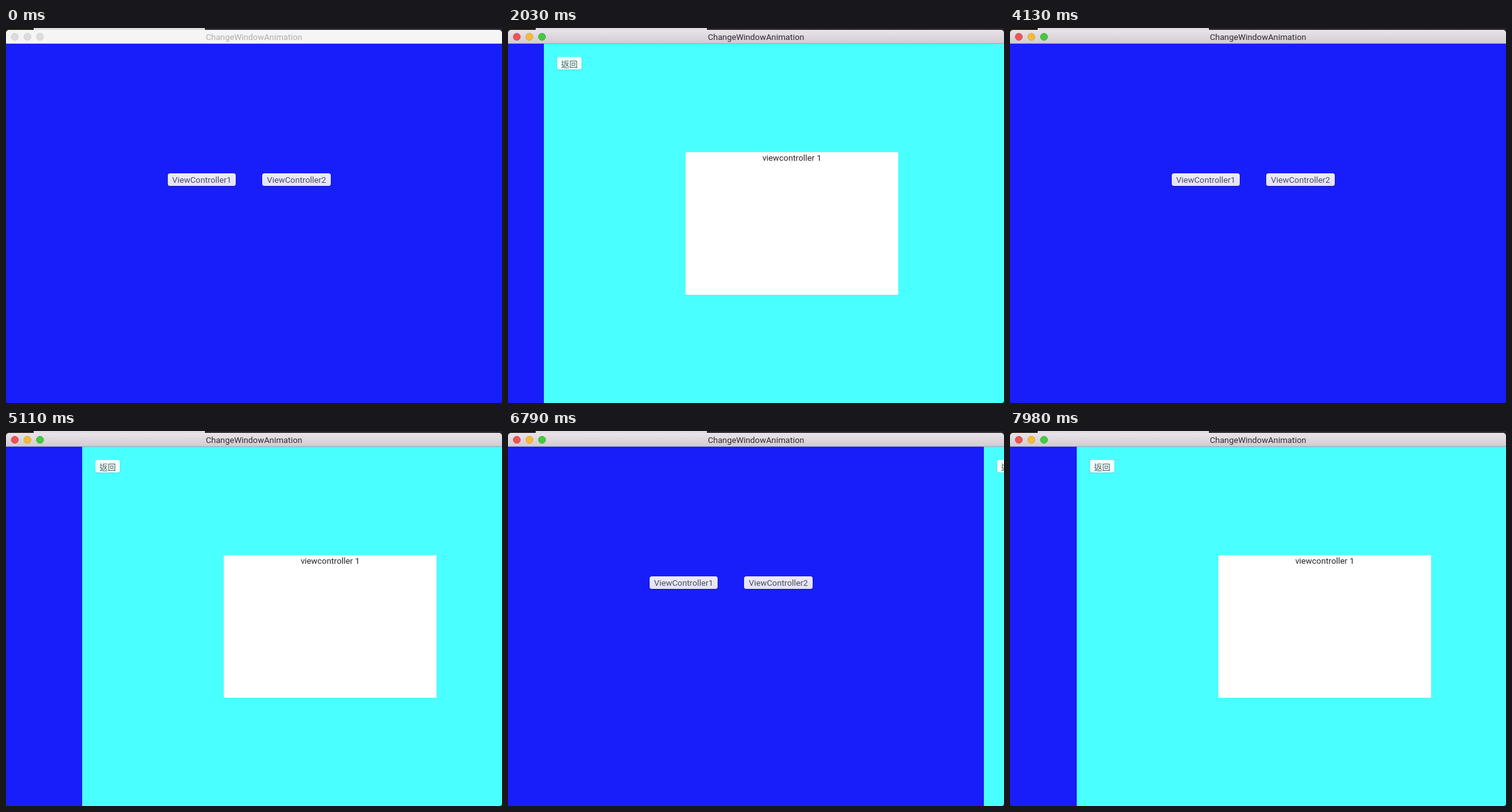
These frames come from a looping animation (788 px wide and 596 px high, 8 s). An HTML page with a canvas:

```html
<!DOCTYPE html>
<html lang="en">
<head>
<meta charset="utf-8">
<title>Window transition</title>
<style>
  html, body { margin: 0; width: 100%; height: 100%; overflow: hidden; background: #29242e; }
  canvas { display: block; }
</style>
</head>
<body>
<canvas id="stage" width="788" height="596"></canvas>
<script>
const W = 788, H = 596, LOOP = 8000, STEP = 70, SLIDE = 850;
const BAR_TOP = 3, BAR_BOTTOM = 25;
const BLUE = '#181efa', CYAN = '#4affff';
const LATIN = '13.3px Roboto, Inter, sans-serif';
const CJK = '13px "Noto Sans CJK TC", "Noto Sans CJK SC", "Noto Sans CJK JP", "Noto Sans CJK", sans-serif';
const ctx = document.getElementById('stage').getContext('2d');

// Each slide moves the cyan page's left edge to a new position.
const slides = [
  { start: 1459, to: 0 },
  { start: 3304, to: W },
  { start: 4644, to: 0 },
  { start: 6155, to: W },
  { start: 7494, to: 0 }
];

// Cubic bezier (.25, .1, .25, 1), solved by bisection.
function ease(p) {
  if (p <= 0) return 0;
  if (p >= 1) return 1;
  let lo = 0, hi = 1;
  for (let i = 0; i < 24; i++) {
    const u = (lo + hi) / 2;
    if (0.75 * u * (1 - u) + u ** 3 < p) lo = u; else hi = u;
  }
  const u = lo, v = 1 - u;
  return 0.3 * v * v * u + 3 * v * u * u + u ** 3;
}

function pageEdge(t) {
  let x = W;
  for (const { start, to } of slides) x += (to - x) * ease((t - start) / SLIDE);
  return Math.round(x);
}

function rect(x, y, w, h, fill) {
  ctx.fillStyle = fill;
  ctx.fillRect(x, y, w, h);
}

function rounded(x, y, w, h, r, fill) {
  ctx.beginPath();
  ctx.roundRect(x, y, w, h, r);
  ctx.fillStyle = fill;
  ctx.fill();
}

function gradient(y0, y1, from, to) {
  const g = ctx.createLinearGradient(0, y0, 0, y1);
  g.addColorStop(0, from);
  g.addColorStop(1, to);
  return g;
}

function label(text, x, baseline, color, font = LATIN) {
  ctx.font = font;
  ctx.textAlign = 'center';
  ctx.textBaseline = 'alphabetic';
  ctx.fillStyle = color;
  ctx.fillText(text, x, baseline);
}

function button(text, x, y, w, look) {
  rounded(x - 0.5, y, w + 1, 20.8, 4, look.shadow);
  rounded(x, y, w, 20, 3.5, gradient(y, y + 20, look.top, look.bottom));
  label(text, x + w / 2, y + look.baseline, look.ink, look.font);
}

const homeLook = { top: '#ececfd', bottom: '#e2e1fb', shadow: 'rgba(0,0,70,.55)', ink: '#4c4c5c', baseline: 15, font: LATIN };
const backLook = { top: '#f2ffff', bottom: '#edffff', shadow: 'rgba(0,110,120,.28)', ink: '#4b5656', baseline: 16, font: CJK };

function homePage(x) {
  ctx.save();
  ctx.translate(x, 0);
  rect(0, BAR_BOTTOM, W, H - BAR_BOTTOM, BLUE);
  button('ViewController1', 257, 231, 108, homeLook);
  button('ViewController2', 407, 231, 109, homeLook);
  ctx.restore();
}

function detailPage(x) {
  ctx.save();
  ctx.translate(x, 0);
  rect(0, BAR_BOTTOM, W, H - BAR_BOTTOM, CYAN);
  button('返回', 21, 46, 39, backLook);
  rect(225, 197, 338, 227, '#fff');
  rect(225, 197, 338, 1, '#d5f3f3');
  label('viewcontroller 1', 394, 211, '#262626');
  ctx.restore();
}

function titleBar(active) {
  const fill = active ? gradient(BAR_TOP, 24, '#eae3ea', '#d2ccd3') : '#f6f5f6';
  rect(0, BAR_TOP, W, 21, fill);
  rect(0, 24, W, 1, active ? '#aaa4b8' : '#d5d3e4');
  const lights = active
    ? [['#ee5358', '#d0444a'], ['#f6bb36', '#d9a12c'], ['#43cb3e', '#34ad31']]
    : Array(3).fill(['#dddbdd', '#cdcbcd']);
  lights.forEach(([color, rim], i) => {
    ctx.beginPath();
    ctx.arc(14 + 20 * i, 14, 5.6, 0, 2 * Math.PI);
    ctx.fillStyle = color;
    ctx.fill();
    ctx.strokeStyle = rim;
    ctx.lineWidth = 0.9;
    ctx.stroke();
  });
  label('ChangeWindowAnimation', 394, 19, active ? '#2f2c30' : '#aeacae');
}

function backdrop() {
  rect(0, 0, W, H, '#29242e');
  rect(0, 0, 44, 4, '#1d1a10');
  rect(44, 0, 272, 4, '#dedcde');
}

function draw(t) {
  const x = pageEdge(t);
  backdrop();
  ctx.save();
  ctx.beginPath();
  ctx.roundRect(0, BAR_TOP, W, H - BAR_TOP, [5, 5, 4, 4]);
  ctx.clip();
  homePage(x - W);
  if (x < W) detailPage(x);
  titleBar(t >= STEP);
  ctx.restore();
}

const origin = performance.now();
function tick() {
  const t = (performance.now() - origin) % LOOP;
  draw(Math.floor(t / STEP) * STEP);
  requestAnimationFrame(tick);
}
tick();
</script>
</body>
</html>
```
